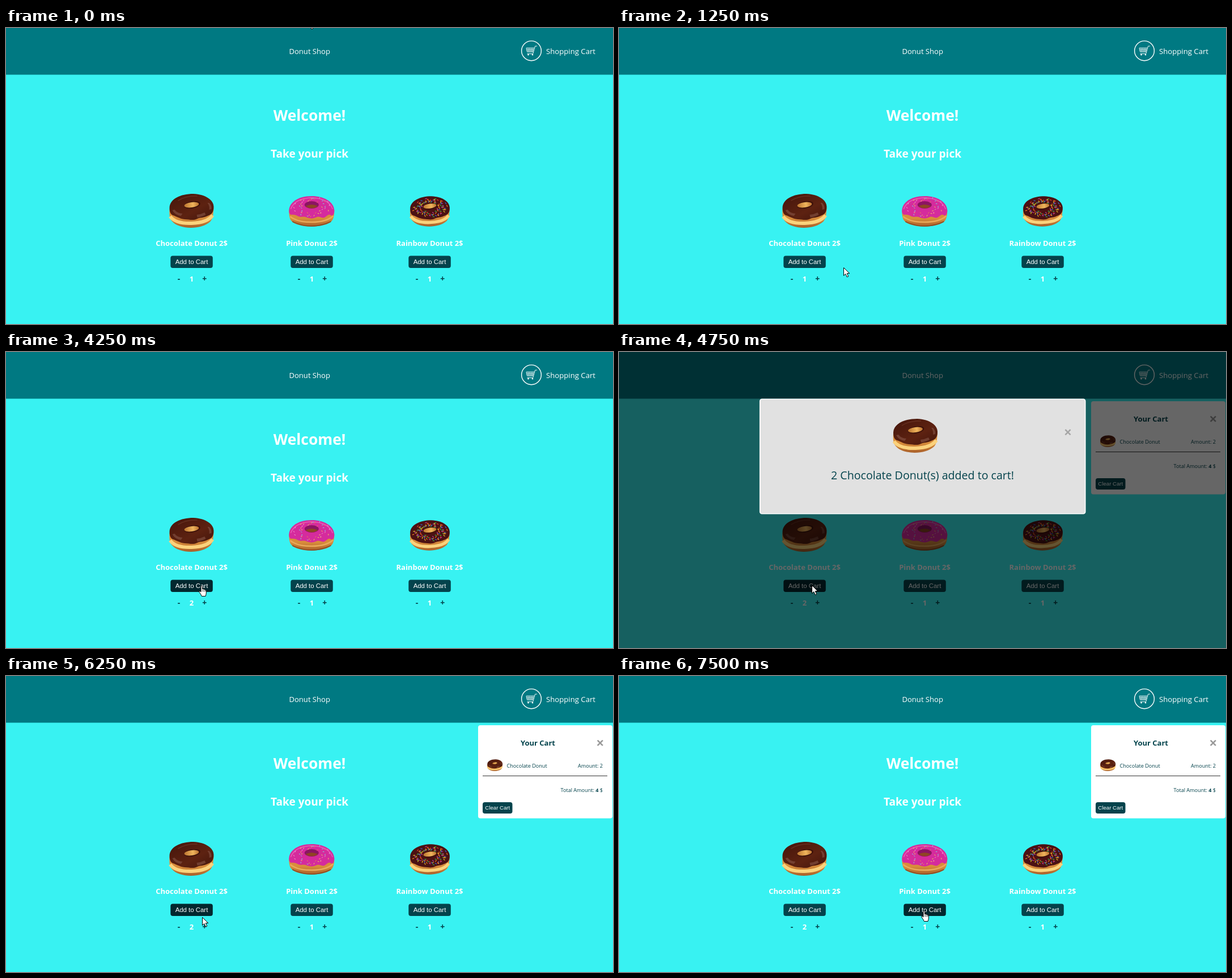
These frames come from a looping animation (1071 px wide and 523 px high, 8000 ms). An HTML page:

```html
<!DOCTYPE html>
<html lang="en">
<head>
<meta charset="utf-8">
<title>Donut Shop</title>
<style>
  html, body { margin: 0; width: 100%; height: 100%; overflow: hidden; }
  svg { display: block; width: 1071px; height: 523px; font-family: "Open Sans", "Noto Sans", sans-serif; }
  .b { font-weight: 700; }
  .button { font-family: "Liberation Sans", Arial, sans-serif; }
</style>
</head>
<body>
<svg id="stage" viewBox="0 0 1071 523">
  <defs>
    <linearGradient id="dough" x2="0" y2="1">
      <stop offset=".5" stop-color="#d98d3b"/><stop offset="1" stop-color="#a9602a"/>
    </linearGradient>
    <linearGradient id="choco" x2="1" y2="1">
      <stop offset="0" stop-color="#45150b"/><stop offset=".6" stop-color="#5d2211"/><stop offset="1" stop-color="#43150c"/>
    </linearGradient>
    <linearGradient id="core" x2="1">
      <stop offset="0" stop-color="#bd7530"/><stop offset=".6" stop-color="#efb55d"/><stop offset="1" stop-color="#b96f2e"/>
    </linearGradient>
  </defs>
</svg>
<script>
const stage = document.getElementById('stage');
const DARK = '#04434c';

const text = (x, y, size, str, fill = '#fff', anchor = 'middle', cls = '') =>
  `<text x="${x}" y="${y}" font-size="${size}" fill="${fill}" text-anchor="${anchor}" class="${cls}">${str}</text>`;
const rect = (x, y, w, h, r, fill, extra = '') =>
  `<rect x="${x}" y="${y}" width="${w}" height="${h}" rx="${r}" fill="${fill}" ${extra}/>`;
const path = (d, fill, extra = '') => `<path d="${d}" fill="${fill}" ${extra}/>`;
const at = (x, y, content, scale = 1) => `<g transform="translate(${x} ${y}) scale(${scale})">${content}</g>`;
const cross = (x, y, r, color) =>
  path(`M${x - r} ${y - r}l${2 * r} ${2 * r}m0 ${-2 * r}l${-2 * r} ${2 * r}`, 'none', `stroke="${color}" stroke-width="2.6"`);

// Sprinkles scattered over the icing ring, leaving the hole free
function sprinkles(count, seed, colors, length, width) {
  const random = () => (seed = seed * 16807 % 2147483647) / 2147483647;
  let out = '';
  for (let i = 0; i < count; i++) {
    const a = i * 2.4, r = .47 + .47 * random(), turn = random() * 6.3;
    const x = 37 * r * Math.cos(a), y = -8 + 20 * r * Math.sin(a);
    out += path(`M${x.toFixed(1)} ${y.toFixed(1)}l${(length * Math.cos(turn)).toFixed(1)} ${(length * Math.sin(turn)).toFixed(1)}`,
      'none', `stroke="${colors[i % colors.length]}" stroke-width="${width}" stroke-linecap="round"`);
  }
  return out;
}

const layered = icing =>
  path('M-39-4C-40 10-38 15-34 19C-22 33 17 34 33 19C38 13 38 6 39-5Z', 'url(#dough)') +
  path('M-38 10Q-28 23 0 22Q28 21 37 8', 'none', 'stroke="#fbd27c" stroke-width="6"') +
  path('M-39-6C-38-21-20-30 3-30C25-29 39-19 39-7C39 5 33 7 28 9C20 13 17 11 10 14C2 18-4 15-12 15C-22 14-28 9-33 8C-38 6-39 0-39-6Z', icing) +
  '<ellipse cx="1" cy="-10.5" rx="14.5" ry="6" transform="rotate(-10 1 -10)" fill="#3a1009"/>' +
  '<ellipse cx="0" cy="-10.5" rx="13" ry="4.6" transform="rotate(-8 0 -10)" fill="url(#core)"/>';

const chocolate = layered('url(#choco)') +
  path('M-34-1Q-30 7-19 9L-16 5Q-26 4-30-2ZM9 7Q17 6 23 3L25 7Q18 11 10 12ZM31-14Q36-9 35-3L31-2Q32-9 28-14Z', '#8a5a4b', 'opacity=".55"') +
  path('M-24-18Q-10-27 10-26', 'none', 'stroke="#7d4331" stroke-width="1.5" opacity=".5"');

const rainbow = layered('#4b1113') +
  sprinkles(95, 77, ['#e8c22d', '#d83a2d', '#3fae49', '#3566c9', '#ef7a24', '#b5409b'], 2.8, 1.4);

const pink =
  path('M-40-2C-40 12-38 16-32 20C-17 29 17 29 32 20C38 16 40 9 40-2Z', 'url(#dough)') +
  path('M-38 9Q-26 19 0 19Q26 19 38 8', 'none', 'stroke="#e9a95a" stroke-width="2.5"') +
  path('M-34 18Q0 34 34 18', 'none', 'stroke="#8a4a24" stroke-width="1.5"') +
  path('M-40-2C-39-18-21-27 0-27C22-27 39-17 40-2C40 5 37 9 34 7C31 4 28 7 24 10C19 14 15 8 9 10C3 13-2 13-8 11C-14 8-18 11-23 9C-29 6-32 5-36 6C-40 5-40 1-40-2Z', '#d52b9d') +
  path('M-37-4Q-30-23 0-24Q30-23 37-4', 'none', 'stroke="#e75cb9" stroke-width="1.5"') +
  '<ellipse cx="0" cy="-11.5" rx="12.5" ry="6.5" fill="#8c1463"/>' +
  path('M-11-9Q0-15 11-9Q0-2-11-9Z', '#8f4424') +
  sprinkles(42, 31, ['#f3d45a', '#f6a8d9', '#7fd3e8', '#f08a4b'], 1.7, 1);

const arrow = path('M.5.5V14.5L3.8 11.5L6.2 17L8.7 16L6.3 10.6H10.8Z', '#fff', 'stroke="#000"');
const hand = path('M4 1.5Q5.5-.2 6.6 1.8V7Q8.5 6 9.2 7.6Q11 6.8 11.5 8.6Q13 8 13.3 10V14Q13 16.5 12 19.5H5.3Q4 15.8 1 12.3Q.2 10.4 2 10.2L4 12Z',
  '#fff', 'stroke="#000" stroke-linejoin="round"') + path('M7 8v3.5m2.3-3v3m2.3-2.4v2.4', 'none', 'stroke="#000" stroke-width=".7"');

const header = rect(0, 0, 1071, 82.5, 0, '#007982') +
  text(535.7, 45.5, 13.05, 'Donut Shop') +
  '<circle cx="927" cy="40.3" r="17.4" fill="none" stroke="#fff" stroke-width="1.4"/>' +
  path('M937 32H933.6L929.8 45.5H919.5M918 35.3H932.7M919.5 42.2H930.7M918 35.3L919.5 42.2M921 35.5l.7 6.5m2.2-6.5l.4 6.5m2.6-6.5v6.5m3-6.5l-.8 6.5M918.6 38.7h13',
    'none', 'stroke="#fff" stroke-width=".9"') +
  '<circle cx="921.5" cy="47.2" r="1.2" fill="#fff"/><circle cx="929" cy="47.2" r="1.2" fill="#fff"/>' +
  text(996.5, 45.5, 13.15, 'Shopping Cart');

const products = [
  { x: 327.5, name: 'Chocolate', art: at(327.5, 323, chocolate) },
  { x: 539.5, name: 'Pink', art: at(539.3, 324, pink) },
  { x: 747.5, name: 'Rainbow', art: at(748, 324, rainbow, .895) },
];

const product = ({ x, name, art }, i) => art +
  text(x, 385, 13, `${name} Donut 2$`, '#fff', 'middle', 'b') +
  rect(x - 37.2, 402.5, 74.5, 21.5, 4, DARK, `id="add${i}"`) +
  text(x, 416.5, 11.4, 'Add to Cart', '#fff', 'middle', 'button') +
  (i ? '' : rect(335, 428, 31, 30, 4, '#000', 'id="plus" opacity=".12"')) +
  text(x - 22.5, 447.5, 14, '-', DARK, 'middle', 'b') +
  `<g id="count${i}">${text(x, 448, 13, '1', '#fff', 'middle', 'b')}</g>` +
  text(x + 22.7, 447.5, 14, '+', DARK, 'middle', 'b');

const cart = rect(833, 87, 237, 164.5, 4, '#fff') +
  text(938.5, 123, 13, 'Your Cart', DARK, 'middle', 'b') + cross(1048.3, 118.3, 4.6, '#999') +
  at(862.7, 157.7, chocolate, .345) +
  text(883.5, 161.5, 9.1, 'Chocolate Donut', DARK, 'start') +
  text(1053, 161.5, 9.1, 'Amount: 2', DARK, 'end') +
  rect(841, 176, 220, 1, 0, '#333') +
  text(1053, 204.5, 9.1, 'Total Amount: <tspan class="b">4</tspan> $', DARK, 'end') +
  rect(841, 223, 52.5, 20, 4, DARK) + text(867.3, 236.3, 9.65, 'Clear Cart', '#fff', 'middle', 'button');

const modal = rect(0, 0, 1071, 523, 0, '#000', 'opacity=".6"') +
  rect(248.7, 83.2, 574, 202.6, 3.5, '#e1e1e1', 'stroke="#fff" stroke-width="1.6"') +
  at(523, 148, chocolate) + cross(792, 141.7, 4.6, '#a5a5a5') +
  text(535.5, 225, 19.6, '2 Chocolate Donut(s) added to cart!', DARK);

stage.innerHTML += rect(0, 0, 1071, 523, 0, '#38f2f2') + header +
  text(535.5, 164, 26.4, 'Welcome!', '#fff', 'middle', 'b') +
  text(535.5, 228.5, 19.1, 'Take your pick', '#fff', 'middle', 'b') +
  products.map(product).join('') +
  `<g id="cart">${cart}</g><g id="modal">${modal}</g>` +
  `<g id="pointer"><g id="arrow">${arrow}</g><g id="hand">${hand}</g></g>`;

// Pointer stops: time, x, y, is hand
const stops = [
  [0, 533, -15], [500, 487, 108], [750, 469, 280], [1000, 415, 349], [1250, 396, 423],
  [1500, 360, 472], [1750, 348, 458], [2000, 350, 439, 1], [2250, 347, 439, 1],
  [3750, 342, 423, 1], [4000, 338, 414, 1], [4250, 340, 412, 1], [4750, 340, 412],
  [5750, 341, 414], [6000, 342, 416], [6250, 346, 426], [6500, 398, 459],
  [6750, 456, 448], [7000, 516, 421], [7250, 528, 425, 1], [7500, 533, 414, 1],
];

const el = id => document.getElementById(id);
const show = (id, on) => el(id).setAttribute('visibility', on ? 'visible' : 'hidden');

function draw(t) {
  const within = (a, b) => t >= a && t < b;
  const [, x, y, isHand] = stops.findLast(stop => stop[0] <= t);
  el('pointer').setAttribute('transform', `translate(${x} ${y})`);
  show('arrow', !isHand);
  show('hand', isHand);
  show('plus', within(2000, 3750));
  show('cart', t >= 4750);
  show('modal', within(4750, 6250));
  el('add0').setAttribute('fill', within(3750, 6500) ? '#02282f' : DARK);
  el('add1').setAttribute('fill', t >= 7250 ? '#02282f' : DARK);
  el('count0').firstChild.textContent = t >= 3250 ? '2' : '1';
}

const start = performance.now();
(function frame() {
  draw((performance.now() - start) % 8000);
  requestAnimationFrame(frame);
})();
</script>
</body>
</html>
```
